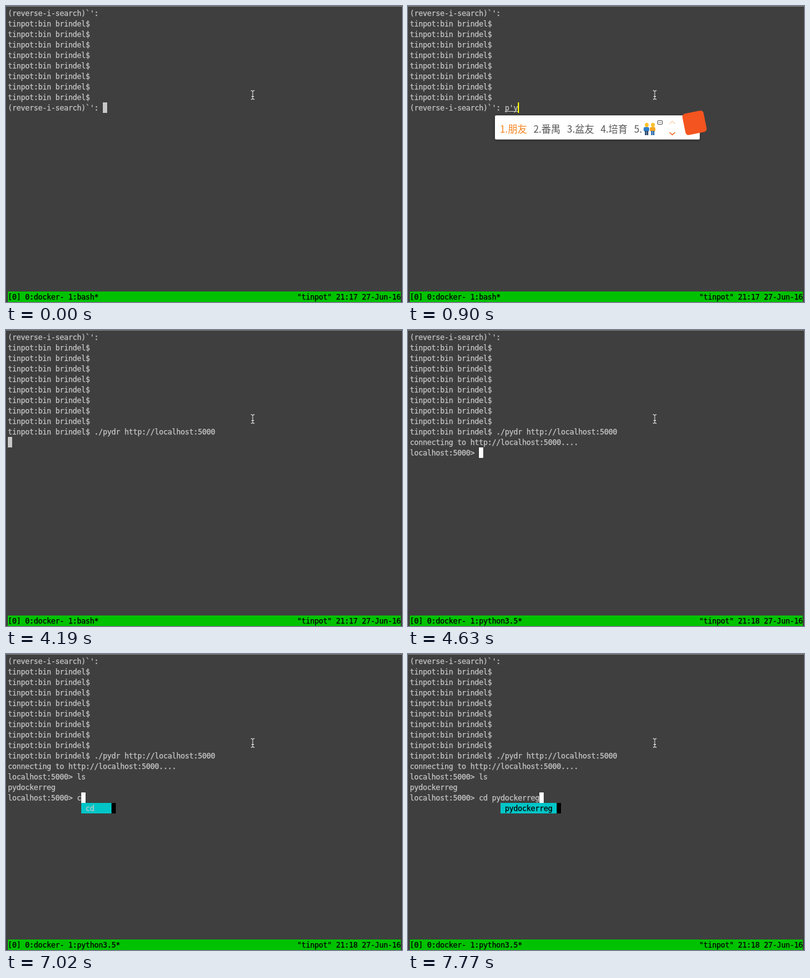
An HTML page with a canvas for the animation above (8 s loop, 642 by 479 pixels).

```html
<!DOCTYPE html>
<html lang="en">
<head>
<meta charset="utf-8">
<title>Terminal session</title>
<style>
  html, body { margin: 0; width: 100%; height: 100%; overflow: hidden; background: #3f3f3f; }
  canvas { display: block; }
</style>
</head>
<body>
<canvas id="stage" width="642" height="479"></canvas>
<script>
const ctx = document.getElementById('stage').getContext('2d');
const LOOP = 8000, CELL_W = 7, CELL_H = 17, PAD = 3;
const BG = '#3f3f3f', FG = '#c7c7c7', GREEN = '#00c200', CYAN = '#00c5c7', ORANGE = '#f5831f';
const MONO = '12px "DejaVu Sans Mono", monospace';
const CJK = '15.5px "Noto Sans CJK SC", "Noto Sans CJK", sans-serif';

const HOST = 'tinpot';
const SHELL = HOST + ':bin brindel$';
const SEARCH = "(reverse-i-search)`': ";
const PROMPT = 'localhost:5000> ';
const HISTORY = [SEARCH, ...Array(8).fill(SHELL)];
const RUN = [SHELL + ' ./pydr http://localhost:5000'];
const CONNECTED = [...RUN, 'connecting to http://localhost:5000....'];
const LISTED = [...CONNECTED, PROMPT + 'ls', 'pydockerreg'];
const SINGLE = ['跑', '怕', '拍', '片', '批'];
const DOUBLE = ['朋友', '番禺', '盆友', '培育', ''];

const typed = (text, menu) => ({ lines: [...LISTED, PROMPT + text], menu, python: true });

// Each step: start time and the screen below the history
const steps = [
  [0, { lines: [SEARCH] }],
  [600, { lines: [SEARCH], ime: { text: 'p', words: SINGLE } }],
  [750, { lines: [SEARCH], ime: { text: 'p', words: DOUBLE } }],
  [900, { lines: [SEARCH], ime: { text: "p'y", words: DOUBLE, bubble: true } }],
  [1340, { lines: ["(reverse-i-search)`py': ./pydr http://localhost:5000"], col: 26 }],
  [4190, { lines: [...RUN, ''] }],
  [4480, { lines: [...CONNECTED, ''] }],
  [4630, { lines: [...CONNECTED, PROMPT], python: true }],
  [5380, { lines: [...CONNECTED, PROMPT + 'ls'], python: true }],
  [6270, { lines: [...LISTED, ''], python: true }],
  [6420, typed('')],
  [7020, typed('c', { col: 17, text: ' cd    ' })],
  [7170, typed('cd')],
  [7320, typed('cd p', { col: 20, text: ' pydockerreg ' })],
  [7470, typed('cd py', { col: 21, text: ' pydockerreg ' })],
  [7770, typed('cd pydockerreg', { col: 21, text: ' pydockerreg ', chosen: true })]
];

const cellX = col => PAD + col * CELL_W;
const cellY = row => PAD + row * CELL_H;

function rect(x, y, w, h, color) {
  ctx.fillStyle = color;
  ctx.fillRect(x, y, w, h);
}

function cells(col, row, count, color) {
  rect(cellX(col), cellY(row), count * CELL_W, CELL_H, color);
}

// The thin outline gives the slightly heavy look of smoothed terminal text
function print(text, col, row, color = FG) {
  ctx.font = MONO;
  ctx.fillStyle = ctx.strokeStyle = color;
  ctx.lineWidth = 0.25;
  [...text].forEach((ch, i) => {
    const x = cellX(col + i), y = cellY(row) + 13;
    ctx.fillText(ch, x, y);
    ctx.strokeText(ch, x, y);
  });
}

function round(x, y, w, h, r, color) {
  ctx.fillStyle = color;
  ctx.beginPath();
  ctx.roundRect(x, y, w, h, r);
  ctx.fill();
}

function line(points, color, width) {
  ctx.strokeStyle = color;
  ctx.lineWidth = width;
  ctx.beginPath();
  points.forEach(([x, y]) => ctx.lineTo(x, y));
  ctx.stroke();
}

function person(x, shirt, trousers) {
  round(x + 2, 189, 6, 7, 3, '#fbc02d');
  round(x, 196, 9, 7, 2, shirt);
  rect(x + 2, 202, 2.5, 7, trousers);
  rect(x + 5, 202, 2.5, 7, trousers);
}

function drawBubble() {
  ctx.strokeStyle = '#555';
  ctx.lineWidth = 1;
  ctx.beginPath();
  ctx.roundRect(404.5, 185.5, 8, 6, 1.5);
  ctx.stroke();
  for (let i = 0; i < 3; i++) rect(406 + i * 2, 188, 1, 1, '#555');
}

function drawIme({ text, words, bubble }) {
  const wide = words === DOUBLE;
  const shift = wide ? 0 : -80;
  const pitch = wide ? 54.4 : 38.5;
  const col = SEARCH.length, end = cellX(col + text.length);

  print(text, col, 9);
  rect(cellX(col), 170, text.length * CELL_W, 1, FG);
  rect(end, 156, 2, CELL_H, '#ffff00');

  ctx.save();
  ctx.shadowColor = 'rgba(0,0,0,.3)';
  ctx.shadowBlur = 5;
  ctx.shadowOffsetY = 1;
  round(141, 177, 332 + shift, 39, 2, '#fff');
  ctx.restore();

  ctx.font = CJK;
  words.forEach((word, i) => {
    ctx.fillStyle = i ? '#555' : ORANGE;
    ctx.fillText(`${i + 1}.${word}`, 149 + i * pitch, 205);
  });
  if (wide) {
    person(382, '#2f7fc8', '#26456e');
    person(392, '#f5a623', '#2f6fb0');
  }
  if (bubble) drawBubble();

  ctx.save();
  ctx.translate(shift, 0);
  line([[424, 190.5], [428.5, 186.5], [433, 190.5]], '#fbd3b0', 1.4);
  line([[424, 204.5], [428.5, 208.5], [433, 204.5]], '#f26a21', 1.6);
  ctx.translate(464.5, 189);
  ctx.rotate(-0.2);
  round(-17.5, -17.5, 35, 35, 5, '#f4541f');
  ctx.restore();
}

function drawPointer() {
  const cap = y => [[397, y], [399, y], [400, y + (y < 144 ? 1 : -1)], [401, y], [403, y]];
  line(cap(137), '#fff', 1);
  line([[400, 138], [400, 150]], '#e8e8e8', 1);
  line(cap(151), '#fff', 1);
  line([[398, 146.5], [402, 146.5]], '#fff', 1);
}

function drawMenu({ col, text, chosen }, row) {
  cells(col, row, text.length, CYAN);
  cells(col + text.length, row, 1, '#000');
  print(text, col, row, chosen ? '#000' : FG);
}

function drawStatus(python) {
  const right = `"${HOST}" 21:${python ? 18 : 17} 27-Jun-16`;
  cells(0, 27, 91, GREEN);
  print(`[0] 0:docker- 1:${python ? 'python3.5' : 'bash'}*`, 0, 27, '#000');
  print(right, 91 - right.length, 27, '#000');
}

function draw(now) {
  const t = now % LOOP;
  const { lines, col, ime, menu, python } = steps.findLast(([start]) => start <= t)[1];
  const last = lines[lines.length - 1];
  const row = HISTORY.length + lines.length - 1;
  const cursor = col ?? last.length;

  rect(0, 0, 642, 479, BG);
  rect(0, 0, 642, 1, '#858585');
  [...HISTORY, ...lines].forEach((text, i) => print(text, 0, i));
  if (ime) {
    drawIme(ime);
  } else {
    cells(cursor, row, 1, last.startsWith(PROMPT) ? '#fff' : FG);
    print(last[cursor] ?? '', cursor, row, BG);
  }
  if (menu) drawMenu(menu, row + 1);
  drawStatus(python);
  drawPointer();
}

const began = performance.now();
function tick() {
  draw(performance.now() - began);
  requestAnimationFrame(tick);
}
tick();
</script>
</body>
</html>
```
